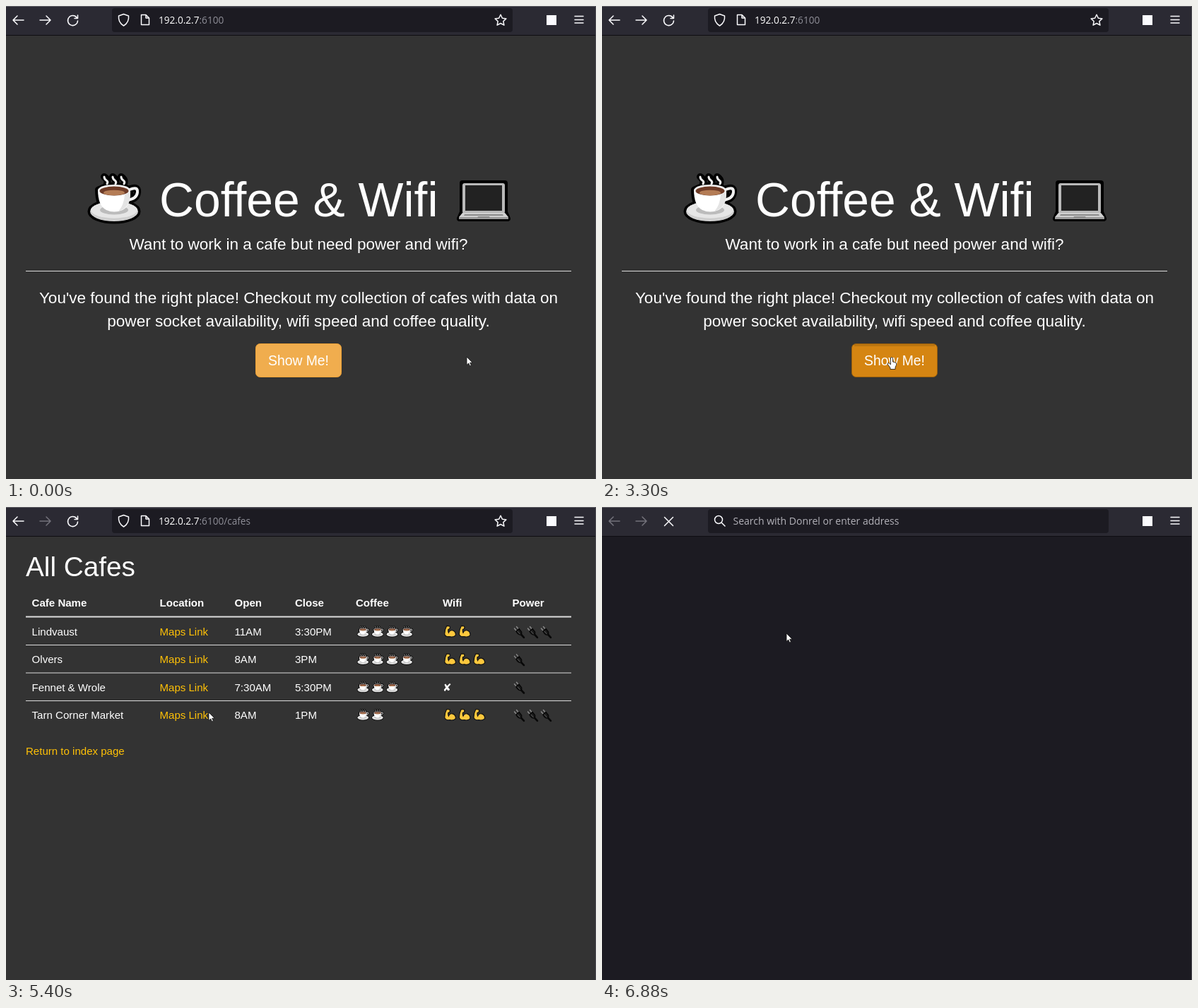
Animation, 835 px wide and 670 px high, one loop 8000 ms. Source, as an HTML page:

```html
<!DOCTYPE html>
<html lang="en">
<head>
<meta charset="utf-8">
<title>Coffee &amp; Wifi</title>
<style>
html, body { margin: 0; width: 100%; height: 100%; overflow: hidden; background: #333; }
svg { display: block; width: 835px; height: 670px; }
text { font: 15.05px "Liberation Sans", Arial, sans-serif; fill: #fff; font-variant-ligatures: none; }
.ui { font: 14px "Open Sans", "Noto Sans", sans-serif; }
.url { font-size: 13.6px; }
.url tspan { fill: #8f8f98; }
.mid { text-anchor: middle; }
.lead { font-size: 22.55px; }
.bold { font-weight: bold; }
.link { fill: #ffc107; }
.link.over { fill: #23527c; text-decoration: underline; }
.icon { fill: none; stroke: #fbfbfe; stroke-width: 1.5; stroke-linecap: round; stroke-linejoin: round; }
.dim { stroke: #74737c; }
.rule { stroke: #ddd; }
</style>
</head>
<body>
<svg viewBox="0 0 835 670">
  <defs>
    <!-- 76 x 72 cup -->
    <g id="cup">
      <g fill="#000" stroke="#000" stroke-width="8" stroke-linecap="round" stroke-linejoin="round">
        <ellipse cx="38" cy="54" rx="33.5" ry="13.5"/>
        <path d="M15 23Q15 46 27 52H50Q62 46 61 23Q38 10 15 23Z"/>
        <path d="M61 22Q72 18 71 27Q70 36 59 38M24 5Q30 9 28 15M36 5Q42 9 40 15M48 5Q54 9 52 15" fill="none" stroke-width="10"/>
      </g>
      <ellipse cx="38" cy="54" rx="34" ry="14" fill="#cfcfcf"/>
      <ellipse cx="38" cy="52" rx="33" ry="11.5" fill="#e6e6e6"/>
      <ellipse cx="38" cy="52" rx="20" ry="6.5" fill="#bcbcbc"/>
      <path d="M60 23Q72 18 71 27Q70 36 57 38" fill="none" stroke="#f1f1f1" stroke-width="4"/>
      <path d="M15 23Q15 46 27 52Q38 57 50 52Q62 46 61 23Z" fill="#fff"/>
      <path d="M53 30Q52 45 44 54Q62 49 61 24Z" fill="#e4e4e4"/>
      <ellipse cx="38" cy="24" rx="23" ry="8" fill="#f3f3f3"/>
      <ellipse cx="38" cy="25" rx="20.5" ry="6.5" fill="#6d3b27"/>
      <ellipse cx="38" cy="27.5" rx="15" ry="3.8" fill="#b47c55"/>
      <path d="M24 5Q24 8 27 10T28 15M36 5Q36 8 39 10T40 15M48 5Q48 8 51 10T52 15" fill="none" stroke="#eee" stroke-width="3" stroke-linecap="round"/>
    </g>
    <path id="arm" d="M4.8 1.5L9 1.8Q10.6 4 8.8 6L7 6.6Q6.6 9.5 7.6 11.5Q9.2 7.6 13 8Q18 9 18 15Q14.5 18.6 9 17Q3 18 1.8 13.5Q1.8 7 4.8 1.5Z" fill="#ffc83d" stroke="#111" stroke-width="1.2"/>
    <g id="plug" fill="none" stroke-linecap="round" stroke-linejoin="round">
      <path d="M1 4L4 7.5M4 1.5L7 5" stroke="#8c8c8c" stroke-width="1.4"/>
      <path d="M3.5 8L7.5 4.5L11 9Q11.5 13 9.5 13Q6 13 3.5 8Z" fill="#1d1d1d" stroke="#080808" stroke-width="1.6"/>
      <path d="M10 12L14.5 16.8" stroke="#080808" stroke-width="2.6"/>
      <path d="M5.5 8.2L9 12" stroke="#666" stroke-width=".9"/>
    </g>
  </defs>

  <rect width="835" height="670" fill="#333"/>

  <g id="home">
    <use href="#cup" x="115" y="237"/>
    <g stroke-linejoin="round">
      <path d="M646 251H706V292L710 301H642L646 292Z" stroke="#000" stroke-width="8"/>
      <rect x="646" y="251" width="60" height="43" rx="3" fill="#b9b9b9"/>
      <rect x="650" y="254" width="52" height="36" fill="#222"/>
      <path d="M646 293H706L711 299V302H641V299Z" fill="#d0d0d0"/>
      <path d="M641 299H711V302H641Z" fill="#999"/>
      <path d="M649 295H703L704 297H648ZM668 298H684L685 300H667Z" fill="#8a8a8a"/>
    </g>
    <text class="mid" x="414.3" y="298" style="font-size:67.8px">Coffee &amp; Wifi</text>
    <text class="mid lead" x="414" y="345">Want to work in a cafe but need power and wifi?</text>
    <path class="rule" d="M28 375.5H800"/>
    <text class="mid lead" x="414" y="421">You've found the right place! Checkout my collection of cafes with data on</text>
    <text class="mid lead" x="414" y="454">power socket availability, wifi speed and coffee quality.</text>
    <rect id="button" x="353.5" y="478.5" width="121" height="47" rx="6"/>
    <path id="shade" d="M357 480.5H471" stroke="#000" stroke-opacity=".12" stroke-width="3"/>
    <text class="mid" x="414" y="508.5" style="font-size:19.35px">Show Me!</text>
  </g>

  <g id="list">
    <text x="28" y="98" style="font-size:38.7px">All Cafes</text>
    <path class="rule" d="M28 155.5H800" stroke-width="2"/>
    <path class="rule" d="M28 195.5H800M28 235H800M28 274.5H800"/>
    <g id="cells"></g>
    <text class="link" x="28" y="351">Return to index page</text>
  </g>

  <rect id="blank" y="42" width="835" height="628" fill="#1c1b22"/>

  <g id="toolbar">
    <rect width="835" height="41" fill="#2b2a33"/>
    <rect y="41" width="835" height="1" fill="#0e0d12"/>
    <rect width="835" height="1" fill="#626167"/>
    <rect x="150" y="3" width="567" height="34" rx="4" fill="#1c1b22"/>
    <path id="back" class="icon" d="M25 20H10M16 14L10 20L16 26"/>
    <path id="forward" class="icon" d="M48 20H63M57 14L63 20L57 26"/>
    <path id="reload" class="icon" d="M100.2 16.5A7 7 0 1 0 101.5 21M101.5 13V17.5H97"/>
    <path id="stop" class="icon" d="M88.5 14.5L100.5 26.5M100.5 14.5L88.5 26.5"/>
    <g id="site">
      <path class="icon" d="M166.5 11.5L173.5 14Q174.5 23 166.5 28Q158.500 23 159.500 14Z"/>
      <path class="icon" d="M191.500 12.500H198L202.500 17V26.500H191.500ZM198 12.500V17H202.500"/>
      <text class="ui url" x="216" y="25">192.0.2.7<tspan id="path"></tspan></text>
      <path id="star" class="icon"/>
    </g>
    <g id="search">
      <circle class="icon" cx="165" cy="18" r="5.500"/>
      <path class="icon" d="M169 22L174 27"/>
      <text class="ui" x="185.500" y="25" style="fill:#b3b2b9">Search with Donrel or enter address</text>
    </g>
    <rect x="765" y="13" width="14" height="14" fill="#fbfbfe"/>
    <path class="icon" d="M805 14.500H817M805 19.500H817M805 24H817"/>
  </g>
  <rect x="834" width="1" height="670" fill="#4b4a50"/>

  <g id="pointer" fill="#fff" stroke="#111" stroke-width=".8" stroke-linejoin="round">
    <path id="arrow" d="M0 0V11.500L2.700 9L4.500 13L6.400 12.200L4.700 8.200H8.200Z"/>
    <path id="hand" d="M-1.500 -1.500Q0 -3.500 1.500 -1.500V4L5.500 5Q7 5.500 6.500 8.500L5 12V14.500H-2V12.500L-6 7Q-5.500 4.800 -3.500 6L-1.500 8Z"/>
  </g>
</svg>
<script>
const $ = id => document.getElementById(id);
const show = (id, on) => $(id).style.display = on ? '' : 'none';

const columns = [36.6, 217.5, 323.5, 409, 495, 618, 716.5];
// name, opens, closes, then ratings for coffee, wifi, power
const cafes = [
  ['Lindvaust', '11AM', '3:30PM', 4, 2, 3],
  ['Olvers', '8AM', '3PM', 4, 3, 1],
  ['Fennet &amp; Wrole', '7:30AM', '5:30PM', 3, 0, 1],
  ['Tarn Corner Market', '8AM', '1PM', 2, 3, 3]
];
const rowY = i => 176.5 + i * 39.35;
const label = (s, col, y, cls = '') => `<text class="${cls}" x="${columns[col]}" y="${y}">${s}</text>`;
const repeat = (n, id, x, y, step, scale) => Array.from({ length: n }, (_, i) =>
  `<use href="#${id}" transform="translate(${x + i * step} ${y}) scale(${scale})"/>`).join('');

$('cells').innerHTML =
  ['Cafe Name', 'Location', 'Open', 'Close', 'Coffee', 'Wifi', 'Power']
    .map((s, i) => label(s, i, 141, 'bold')).join('') +
  cafes.map(([name, open, close, coffee, wifi, power], i) => {
    const y = rowY(i), base = Math.round(y + 5.3);
    return label(name, 0, base) + label('Maps Link', 1, base, 'link map') +
      label(open, 2, base) + label(close, 3, base) +
      repeat(coffee, 'cup', 496.5, y - 8.5, 20.6, .23) +
      (wifi ? repeat(wifi, 'arm', 619, y - 9.5, 20.6, .97)
            : `<text x="618" y="${base}" style="font-family:'DejaVu Sans',sans-serif">✘</text>`) +
      repeat(power, 'plug', 718.5, y - 8.5, 19, 1);
  }).join('');
const links = document.querySelectorAll('.map');

$('star').setAttribute('d', 'M' + Array.from({ length: 10 }, (_, i) => {
  const a = i * Math.PI / 5, r = i % 2 ? 4 : 8.3;
  return `${(700 + r * Math.sin(a)).toFixed(1)} ${(20.5 - r * Math.cos(a)).toFixed(1)}`;
}).join('L') + 'Z');

// time, x, y
const track = [
  [1300, 652, 497], [1600, 600, 522], [1900, 520, 551], [2110, 455, 563], [2200, 433, 562],
  [2350, 417, 560], [2500, 412, 545], [2650, 410, 515], [2770, 410, 500], [4980, 410, 500],
  [5150, 375, 438], [5400, 287, 291], [5550, 270, 282], [5760, 262, 270], [5800, 262, 268],
  [6100, 262, 233], [6400, 261, 190], [6550, 261, 179]
];
function pointerAt(t) {
  const i = track.findIndex(k => k[0] > t);
  if (i === 0) return track[0].slice(1);
  if (i < 0) return track[track.length - 1].slice(1);
  const [t0, x0, y0] = track[i - 1], [t1, x1, y1] = track[i];
  const f = (t - t0) / (t1 - t0);
  return [x0 + (x1 - x0) * f, y0 + (y1 - y0) * f];
}

function draw(t) {
  const listed = t >= 3590, newTab = t >= 6880;
  const [x, y] = pointerAt(t);
  const onButton = !listed && x > 353 && x < 475 && y > 478 && y < 526;
  const pressed = t >= 3300 && t < 3450;

  show('home', !listed);
  show('list', listed && !newTab);
  show('blank', newTab);
  show('site', !newTab);
  show('search', newTab);

  const loading = newTab || (t >= 3510 && t < 4300);
  show('reload', !loading);
  show('stop', loading);
  $('stop').classList.toggle('dim', listed && !newTab);
  $('back').classList.toggle('dim', newTab);
  $('forward').classList.toggle('dim', listed);
  $('path').textContent = listed ? ':6100/cafes' : ':6100';

  $('button').setAttribute('fill', pressed ? '#d58512' : onButton ? '#ec971f' : '#f0ad4e');
  $('button').setAttribute('stroke', pressed ? '#985f0d' : onButton ? '#d58512' : '#eea236');
  show('shade', pressed);

  let onLink = false;
  links.forEach((link, i) => {
    const over = listed && x > 217 && x < 286 && Math.abs(y - rowY(i)) < 9;
    link.classList.toggle('over', over);
    onLink = onLink || over;
  });

  const hand = onButton || (onLink && t < 6850);
  show('hand', hand);
  show('arrow', !hand);
  $('pointer').setAttribute('transform', `translate(${Math.round(x)} ${Math.round(y)})`);
}

function tick() {
  draw(performance.now() % 8000);
  requestAnimationFrame(tick);
}
tick();
</script>
</body>
</html>
```
